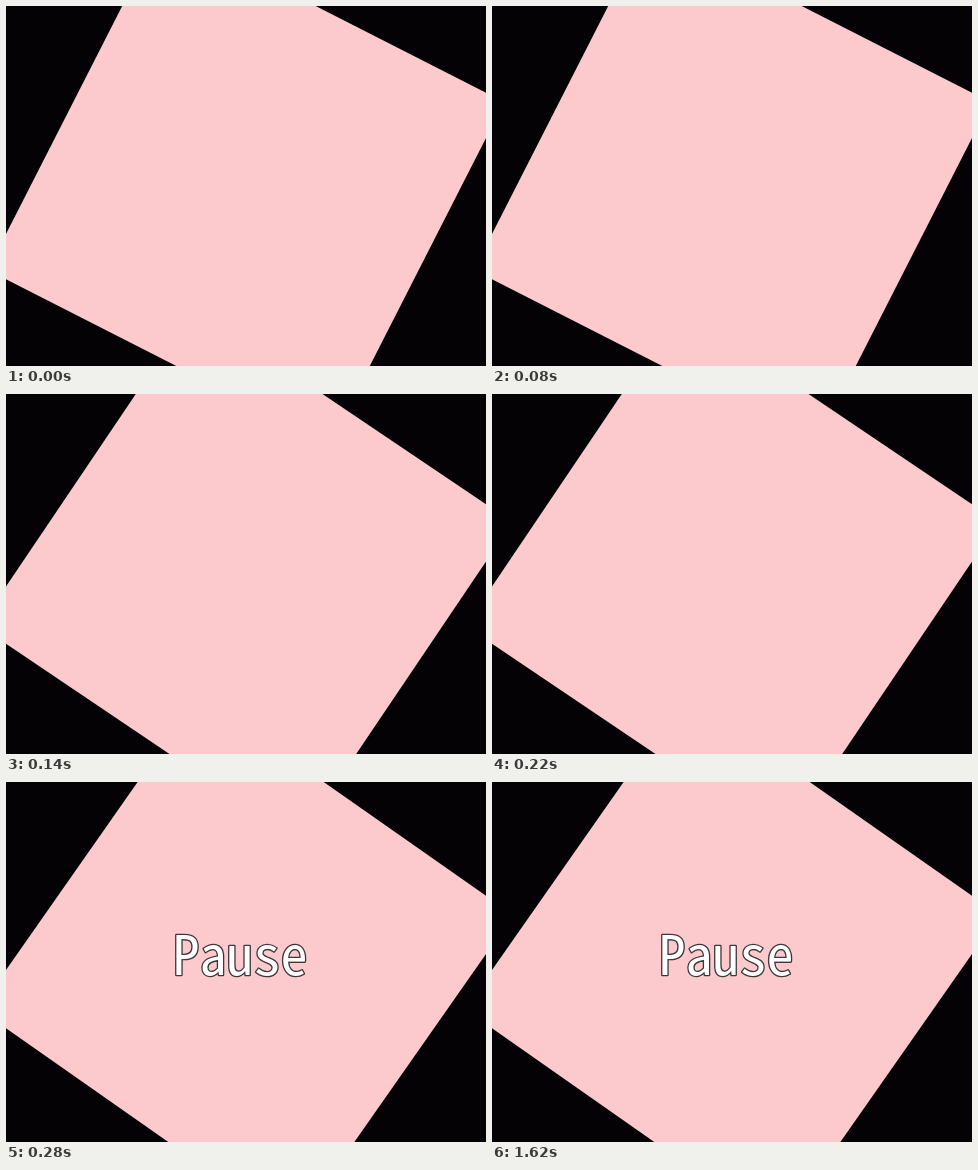
An HTML page for the animation above (2520 ms loop, 480 by 360 pixels).

```html
<!DOCTYPE html>
<html lang="en">
<head>
<meta charset="utf-8">
<title>Pause</title>
<style>
  html, body { margin: 0; width: 100%; height: 100%; overflow: hidden; background: #040204; }
  svg { display: block; width: 480px; height: 360px; }
  #square { fill: #fccacc; transform-origin: 240px 180px; }
  #label {
    font: 400 54px "Noto Sans Mono CJK JP", "Noto Sans Mono CJK SC", "Noto Sans CJK JP", "Noto Sans Mono", monospace;
    fill: #fff;
    stroke: #3c383a;
    stroke-width: 2.6px;
    stroke-linejoin: round;
    paint-order: stroke;
  }
</style>
</head>
<body>
<svg viewBox="0 0 480 360">
  <rect id="square" x="48" y="-12" width="384" height="384"/>
  <text id="label" x="166.5" y="193">Pause</text>
</svg>
<script>
  const LOOP = 2520;
  const steps = [
    { at: 0, angle: 27, label: 0 },
    { at: 140, angle: 34, label: 0 },
    { at: 280, angle: 35, label: 1 },
    { at: LOOP, angle: 35, label: 1 },
  ];

  // Hold each step until the next one begins.
  function play(id, style) {
    const frames = steps.map(s => ({ offset: s.at / LOOP, easing: "step-end", ...style(s) }));
    document.getElementById(id).animate(frames, { duration: LOOP, iterations: Infinity });
  }

  play("square", s => ({ transform: `rotate(${s.angle}deg)` }));
  play("label", s => ({ opacity: s.label }));
</script>
</body>
</html>
```
